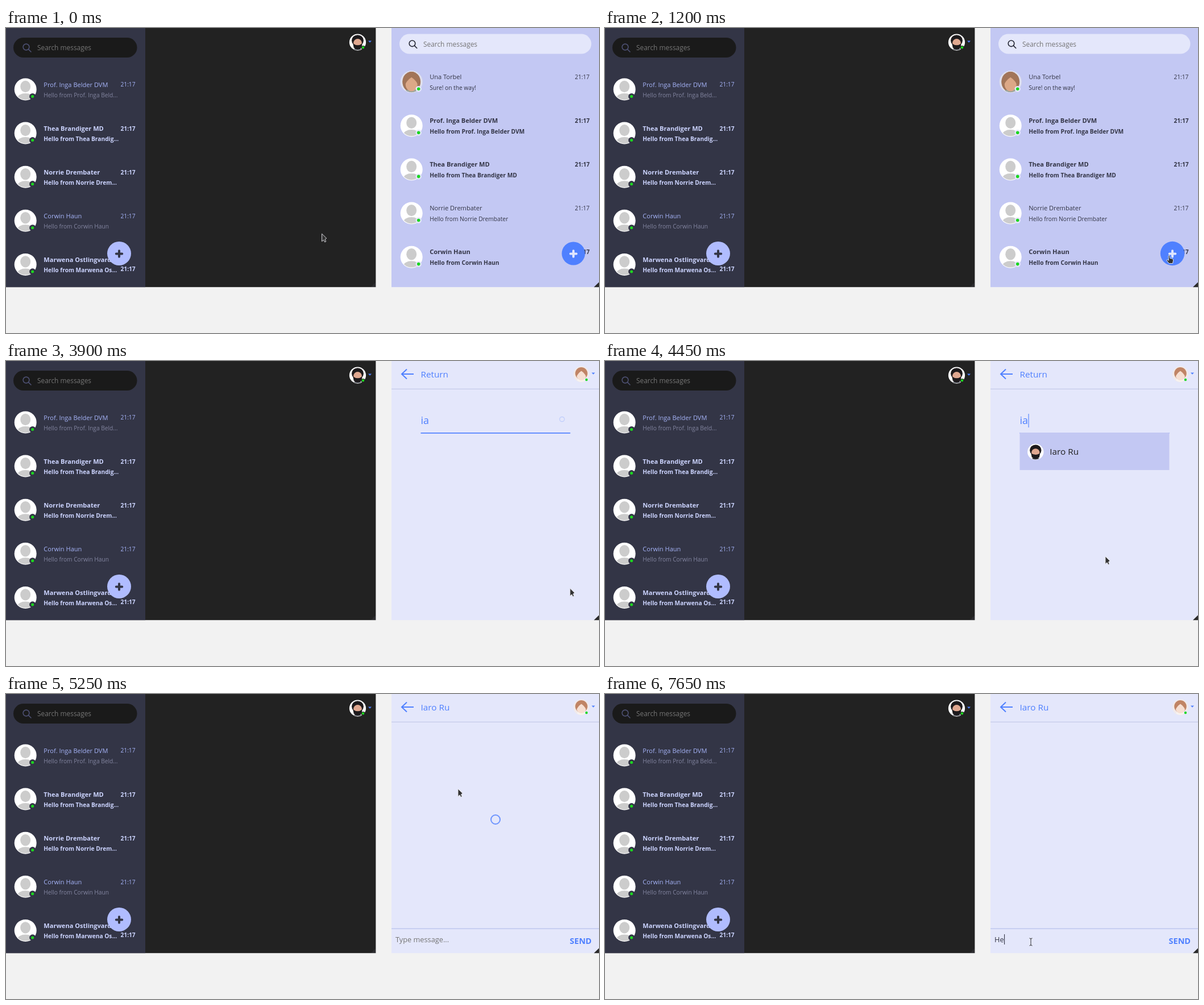
An HTML page for the animation above (8000 ms loop, 1043 by 537 pixels).

```html
<!DOCTYPE html>
<html>
<head>
<meta charset="utf-8">
<style>
html, body { margin: 0; width: 100%; height: 100%; overflow: hidden; background: #f2f2f2; }
svg { display: block; width: 100%; height: 100%; font-family: "Open Sans", "Noto Sans", sans-serif; }
text { white-space: pre; }
</style>
</head>
<body>
<svg id="stage" viewBox="0 0 1043 537"></svg>
<script>
const BLUE = '#4f80ff', PALE = '#e4e7fb', LILAC = '#c3c8f3', NAVY = '#333546', GREEN = '#1cd61f';
const LOOP = 8000, BOTTOM = 456.2;
const CONTACT = 'Iaro Ru';

const text = (x, y, size, fill, s, bold) =>
  `<text x="${x}" y="${y}" font-size="${size}" fill="${fill}" font-weight="${bold ? 700 : 400}">${s}</text>`;
const rect = (x, y, w, h, fill, rx = 0) =>
  `<rect x="${x}" y="${y}" width="${w}" height="${h}" fill="${fill}" rx="${rx}"/>`;
const circle = (x, y, r, fill) => `<circle cx="${x}" cy="${y}" r="${r}" fill="${fill}"/>`;
const ellipse = (x, y, rx, ry, fill) => `<ellipse cx="${x}" cy="${y}" rx="${rx}" ry="${ry}" fill="${fill}"/>`;
const path = (d, fill, stroke = 'none', w = 1) =>
  `<path d="${d}" fill="${fill}" stroke="${stroke}" stroke-width="${w}"/>`;
const at = (x, y, s, k = 1) => `<g transform="translate(${x} ${y}) scale(${k})">${s}</g>`;
const group = (id, s) => `<g id="${id}">${s}</g>`;
const dot = (x, y, r, ring, bg) => circle(x, y, ring, bg) + circle(x, y, r, GREEN);

// Avatars are drawn in a circle of radius 19.5
const face = (s, bg = '#fff') => circle(0, 0, 19.5, bg) + `<g clip-path="url(#round)">${s}</g>`;
const fringe = c => path('M-12 7Q-13-14 0-14Q13-14 12 7Q9-2 0-8Q-9-2-12 7Z', c);
const blank = face(ellipse(0, 15.5, 14, 8.5, '#ccc') + ellipse(0, -5, 10.5, 11.5, '#fff') + ellipse(0, -5, 9, 10.2, '#ccc'));
const bearded = face(ellipse(0, 19, 11, 5, '#3b3f48') + ellipse(0, -4, 14, 13, '#1d1a1c') +
  ellipse(0, 2, 9.8, 10, '#e0a890') + path('M-11 3Q0 11 11 3L9 13Q0 20-9 13Z', '#1d1a1c'));
const brown = face(ellipse(0, 0, 16, 18, '#a27559') + ellipse(0, 19, 13, 6, '#9aa39c') +
  ellipse(0, 4, 10.5, 12.5, '#dca887') + fringe('#a27559'), '#dfe0ee');
const auburn = face(ellipse(0, -2, 15, 15, '#c08465') + ellipse(0, 18, 13, 7, '#f7f3f0') +
  ellipse(0, 3, 11.5, 12, '#f6dfd2') + fringe('#c08465'), '#f1eaea');

const lens = (x, y, r, len, c, w) =>
  `<g fill="none" stroke="${c}" stroke-width="${w}" stroke-linecap="round"><circle cx="${x}" cy="${y}" r="${r}"/>` +
  `<path d="M${x + r * .72} ${y + r * .72}l${len} ${len}"/></g>`;
const plus = c => `<path d="M-5.2 0H5.2M0-5.2V5.2" stroke="${c}" stroke-width="4" stroke-linecap="round"/>`;
const chevron = (x, y) => path(`M${x - 3} ${y - 1.5}h6l-3 3.3z`, BLUE);

const PROF = 'Prof. Inga Belder DVM', SAGE = 'Thea Brandiger MD', NOR = 'Norrie Drembater', COR = 'Corwin Haun';
const leftRows = [
  [PROF, 'Prof. Inga Beld...', 0], [SAGE, 'Thea Brandig...', 1], [NOR, 'Norrie Drem...', 1],
  [COR, COR, 0], ['Marwena Ostlingvarden', 'Marwena Os...', 1]
];
const rightRows = [['Una Torbel', '', 0], [PROF, PROF, 1], [SAGE, SAGE, 1], [NOR, NOR, 0], [COR, COR, 1]];

function leftPanel() {
  let s = rect(0, 0, 650.4, BOTTOM, '#222') + rect(0, 0, 245, BOTTOM, NAVY) +
    path('M650 448v8h-8z', '#2d2d30') +
    rect(13, 17, 217.5, 35, '#1a1a1a', 17.5) + lens(35.5, 33.5, 5.4, 4.6, '#4d5072', 1.6) +
    text(55, 39, 11.9, '#757575', 'Search messages');
  leftRows.forEach(([name, sub, bold], i) => {
    const y = 77.1 * i;
    s += at(34.2, 108 + y, blank) + dot(46.7, 120.5 + y, 2.5, 5.6, NAVY) +
      text(66.3, Math.round(103.6 + y), 11.05, bold ? '#ccd4ff' : '#a6b4f8', name, bold) +
      text(66.3, Math.round(122 + y), 10.2, bold ? '#ccd4ff' : '#8385a0', 'Hello from ' + sub, bold) +
      text(201.5, Math.round((i > 3 ? 119.4 : 103.4) + y), 10.2, bold ? '#ccd4ff' : '#a6b4f8', '21:17', bold);
  });
  return s + circle(199, 397, 21, '#b0bcff') + at(199, 397.5, plus(NAVY)) +
    at(618.5, 25, bearded, .75) + dot(628, 34.3, 2.2, 3.4, '#222') + chevron(640, 24);
}

function listScreen() {
  let s = rect(678, 0, 365, BOTTOM, LILAC) + rect(692, 10.5, 337.5, 35, PALE, 17.5) +
    lens(714.5, 27.3, 5.3, 4.4, '#222430', 1.6) + text(734, 33, 11.9, '#757575', 'Search messages');
  rightRows.forEach(([name, sub, bold], i) => {
    const y = 77.1 * i;
    s += at(713.2, 94.8 + y, i ? blank : brown) + dot(725.7, 107.2 + y, 2.8, 5.2, PALE) +
      text(745.2, Math.round(90 + y), 11.05, NAVY, name, bold) +
      text(745.2, Math.round(109 + y), 10.2, NAVY, sub ? 'Hello from ' + sub : 'Sure! on the way!', bold) +
      text(1000.4, Math.round(89.8 + y), 10.2, NAVY, '21:17', bold);
  });
  return s + `<circle id="fab" cx="998" cy="397" r="20.5" fill="${BLUE}"/>` + at(998, 397.5, plus('#e0e6ff'));
}

const header = rect(678, 0, 365, BOTTOM, PALE) + rect(678, 48.7, 365, 1.3, '#c6cbe9') +
  `<path d="M717 23H697M705 14.5L696 23L705 31.5" fill="none" stroke="${BLUE}" stroke-width="2"/>` +
  `<text id="title" x="729.5" y="29" font-size="15.3" fill="${BLUE}"></text>` +
  at(1012, 23.3, auburn, .72) + dot(1021, 33, 2.2, 3.4, PALE) + chevron(1033, 22);

const search = rect(729.5, 126, 263, 1.7, BLUE) +
  group('hint', text(729.5, 111, 17.85, '#757575', 'Type contact name...')) +
  `<text id="query" x="729.5" y="111" font-size="17.85" fill="${BLUE}"></text>` +
  group('result', `<rect id="row" x="729.5" y="126" width="263" height="66"/>` + at(757.3, 160, bearded, .73) +
    text(782.3, 165, 15.3, '#222', CONTACT));

const chat = rect(678, 412.5, 365, 1.3, '#b9c3ee') + group('prompt', text(685, 437, 12.75, '#757575', 'Type message...')) +
  group('message', text(685, 437, 12.75, NAVY, 'He')) + text(991.6, 440, 14.45, BLUE, 'SEND', 1);

const cursors = group('arrow', path('M0 0V13.4L3.1 10.8L5 14.6L7.2 13.6L5.5 9.8L8.2 8Z', '#333', '#e8e8ee', .9)) +
  group('hand', path('M-1 1Q0-.8 1.2 1L1.8 5.5L5.5 6.2Q8 6.8 7.6 9L6.5 14.5H0L-4 9.3Q-4 7.4-2.2 8L-.6 9.3Z', '#333', '#eef0fa', .9)) +
  group('beam', `<path d="M-2.5-6.5Q0-6.5 0-5Q0-6.5 2.5-6.5M0-5.5V5.5M-2.5 6.5Q0 6.5 0 5Q0 6.5 2.5 6.5" fill="none" stroke="#333" stroke-width="1"/>`);

document.getElementById('stage').innerHTML =
  '<defs><clipPath id="round"><circle r="18.4"/></clipPath></defs>' + rect(0, 0, 1043, 537, '#f2f2f2') + leftPanel() +
  group('list', listScreen()) +
  group('page', header + group('search', search) + group('chat', chat)) +
  `<circle id="ring" fill="none" stroke="${BLUE}"/><rect id="caret" width="1.1"/>` +
  path(`M1043 447.5V${BOTTOM}h-9z`, '#2a2a2a') + group('cursor', cursors);

const $ = id => document.getElementById(id);
const show = (id, on) => $(id).style.display = on ? '' : 'none';
const set = (id, attrs) => { for (const k in attrs) $(id).setAttribute(k, attrs[k]); };
// Last entry whose time has come
const pick = (list, t) => list.filter(e => e[0] <= t).pop();

const sweep = [[557, 364], [600, 344], [680, 318], [780, 313], [880, 335], [960, 372], [1005, 399], [1017, 408], [1004, 405], [992, 400]];
const stops = [
  [0, 'arrow', 555.6, 362.3], [50, 'arrow', 555.6, 363.3], [250, 'arrow', 556.6, 364.3], [1200, 'hand', 992, 400],
  [2700, 'arrow', 992, 400.3], [4450, 'arrow', 880, 344], [4700, 'hand', 780, 174], [4950, 'hand', 795, 167],
  [5250, 'arrow', 795, 167], [5500, 'arrow', 762, 296], [5900, 'beam', 748.5, 438.5], [6650, 'beam', 749, 436.5]
];
// time, x, y, height, colour
const carets = [
  [0], [2900, 730, 93, 24, BLUE], [3150, 735, 93, 24, BLUE], [3400, 744.5, 93, 24, BLUE], [3900],
  [4450, 744.5, 93, 24, BLUE], [4950], [6250, 685, 423, 18, NAVY], [6650], [7000, 685, 423, 18, NAVY], [7650, 702, 423, 18, NAVY]
];
// time, x, y, radius, opacity, stroke
const rings = [
  [0], [3900, 978, 102.5, 4.2, .25, 1.2], [4150], [5250, 861, 221, 8, .8, 2],
  [5500, 861, 221, 17, .2, 2], [5900, 861, 221, 13.5, .5, 2], [6250]
];

function pointer(t) {
  if (t < 500 || t >= 1200) return pick(stops, t).slice(1);
  const p = (Math.floor((t - 500) / 50) + 1) / 15 * (sweep.length - 1);
  const i = Math.min(Math.floor(p), sweep.length - 2), f = p - i;
  const [x, y] = sweep[i].map((v, k) => v + (sweep[i + 1][k] - v) * f);
  return [x < 678 ? 'arrow' : 'hand', x, y];
}

function draw(t) {
  const [kind, px, py] = pointer(t);
  set('cursor', { transform: `translate(${px} ${py})` });
  for (const k of ['arrow', 'hand', 'beam']) show(k, k === kind);
  set('fab', { r: Math.hypot(px - 998, py - 397) < 21 ? 21.2 : 20.5 });

  show('list', t < 2700);
  show('page', t >= 2700);
  show('search', t < 5250);
  show('chat', t >= 5250);
  $('title').textContent = t < 5250 ? 'Return' : CONTACT;

  show('hint', t < 3150);
  $('query').textContent = t < 3150 ? '' : t < 3400 ? 'i' : 'ia';
  show('result', t >= 4150);
  set('result', { opacity: t < 4450 ? .7 : 1 });
  set('row', { fill: t < 4700 ? LILAC : BLUE });
  show('prompt', t < 7650);
  show('message', t >= 7650);

  const [, cx, cy, height, fill] = pick(carets, t);
  show('caret', cx);
  if (cx) set('caret', { x: cx, y: cy, height, fill });
  const [, rx, ry, r, opacity, w] = pick(rings, t);
  show('ring', rx);
  if (rx) set('ring', { cx: rx, cy: ry, r, opacity, 'stroke-width': w });
}

const start = performance.now();
function tick() {
  draw((performance.now() - start) % LOOP);
  requestAnimationFrame(tick);
}
tick();
</script>
</body>
</html>
```
